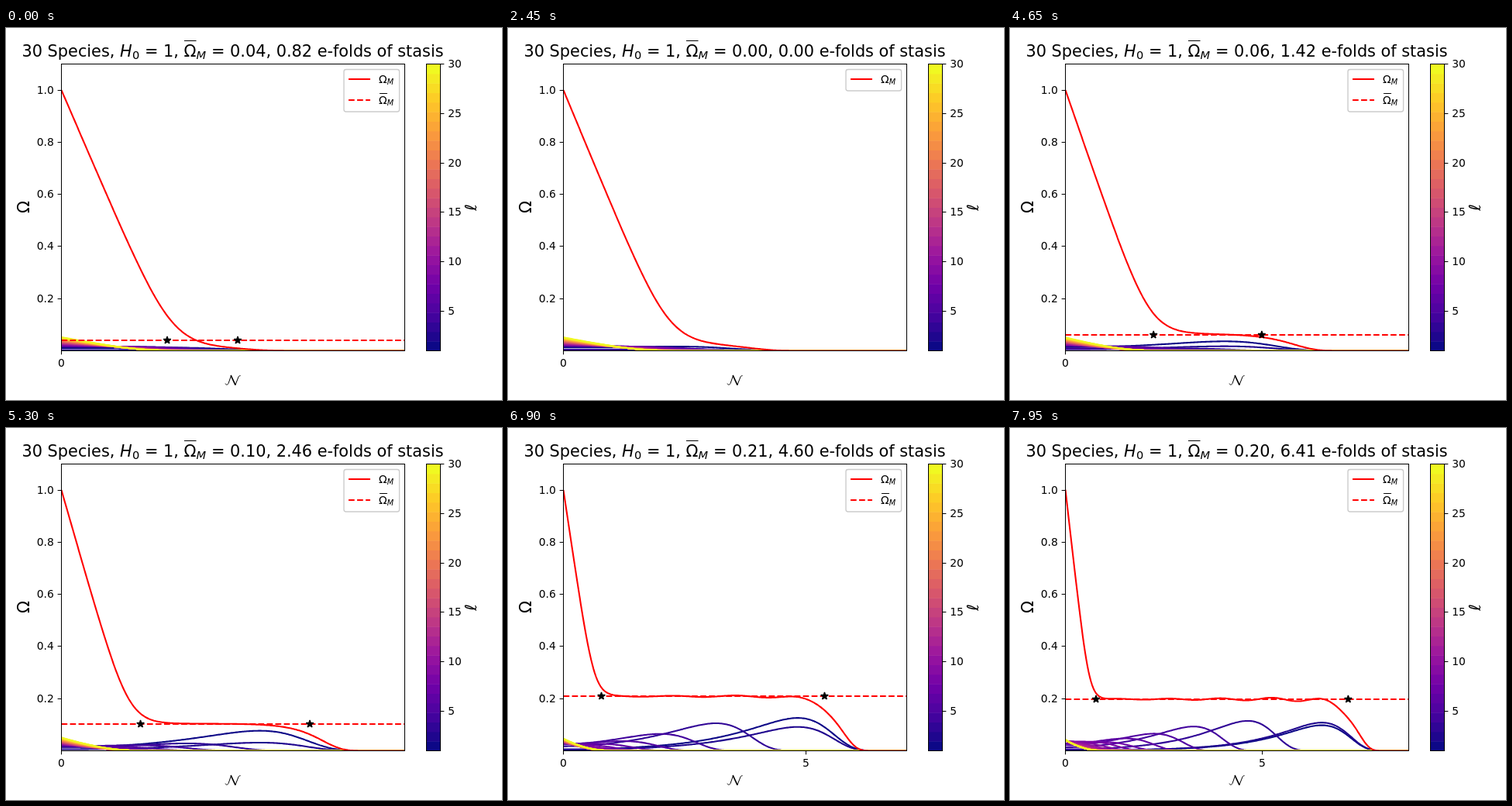
An HTML page for the animation above (8000 ms loop, 640 by 480 pixels).

```html
<!DOCTYPE html>
<html lang="en">
<head>
<meta charset="utf-8">
<title>Stasis</title>
<style>
  html, body { margin: 0; width: 100%; height: 100%; overflow: hidden; background: #fff; }
  svg { display: block; width: 640px; height: 480px; font-family: "DejaVu Sans", sans-serif; }
  text { white-space: pre; }
  .it { font-style: oblique; }
  .ax { fill: none; stroke: #000; stroke-width: 1; }
  .ln { fill: none; stroke-width: 2.08; stroke-linejoin: round; }
  .red { stroke: #f00; }
  .dash { stroke-dasharray: 7.71 3.33; }
</style>
</head>
<body>
<svg id="fig" viewBox="0 0 640 480" xmlns="http://www.w3.org/2000/svg"></svg>
<script>
const LOOP = 8000, STEP = 50, SPECIES = 30;
const X0 = 71.5, X1 = 514.5, Y0 = 416.5, Y1 = 46.5, WIDTH = X1 - X0;
const UNIT = (Y0 - Y1) / 1.1;
const BAR_OFF = 1200, BAR_ON = 4600;

// span: e-folds shown; from, folds: stasis; bar: dashed level
// fall: first slope; flat: plateau; peak: last maximum
// ratio: spacing of log decay rates; base: least starting share
const KEYS = [
  { t: 0,    span: 3.992, from: 1.23,  folds: .82,  bar: .04,   fall: .766, flat: .015, peak: 1.23, ratio: .88, base: .012 },
  { t: 3800, span: 4.15,  from: 1.16,  folds: .5,   bar: .033,  fall: .79,  flat: .035, peak: 1.41, ratio: .86, base: .014 },
  { t: 5300, span: 4.988, from: 1.149, folds: 2.46, bar: .104,  fall: .92,  flat: .104, peak: 2.88, ratio: .65, base: .015 },
  { t: 6250, span: 6.284, from: .851,  folds: 3.56, bar: .202,  fall: 1.1,  flat: .2,   peak: 3.98, ratio: .65, base: .02 },
  { t: 6900, span: 7.077, from: .783,  folds: 4.6,  bar: .211,  fall: 1.25, flat: .209, peak: 4.83, ratio: .68, base: .024 },
  { t: 7950, span: 8.727, from: .778,  folds: 6.41, bar: .197,  fall: 1.33, flat: .198, peak: 6.52, ratio: .73, base: .036 }
];

// Monotone cubic through the points
function pchip(xs, ys) {
  const n = xs.length - 1, d = [], m = [];
  for (let i = 0; i < n; i++) d[i] = (ys[i + 1] - ys[i]) / (xs[i + 1] - xs[i]);
  m[0] = d[0];
  m[n] = d[n - 1];
  for (let i = 1; i < n; i++) m[i] = d[i - 1] * d[i] > 0 ? 2 * d[i - 1] * d[i] / (d[i - 1] + d[i]) : 0;
  return x => {
    if (x >= xs[n]) return ys[n];
    let i = 0;
    while (x > xs[i + 1]) i++;
    const h = xs[i + 1] - xs[i], u = (x - xs[i]) / h, v = 1 - u;
    return ys[i] * v * v * (1 + 2 * u) + ys[i + 1] * u * u * (3 - 2 * u)
      + h * u * v * (m[i] * v - m[i + 1] * u);
  };
}

const tracks = Object.keys(KEYS[0]).slice(1)
  .map(name => [name, pchip(KEYS.map(k => k.t), KEYS.map(k => k[name]))]);
const stateAt = t => Object.fromEntries(tracks.map(([name, f]) => [name, f(t)]));

// Total matter share: soft-cornered fall, rippled plateau, double-exponential end
function matter(s) {
  const soft = .14, ripple = Math.max(0, .012 * (s.span - 5));
  return n => {
    const fall = soft * Math.log1p(Math.exp((1 - s.flat - s.fall * n) / soft));
    const end = Math.exp(-Math.exp((n - s.peak - .92) / .28));
    const wave = 1 + ripple * Math.exp((n - s.peak) / 3) * Math.cos(2 * Math.PI * (n - s.peak) / 1.3);
    return fall + s.flat * end * wave;
  };
}

const PTS = 296, DX = WIDTH / PTS;

// ln H' = m/2 - 2 and ln W' = 1 - m - rate/H for every species
function solve(s) {
  const total = matter(s), dn = s.span / PTS;
  const m = Array.from({ length: PTS + 1 }, (_, i) => total(i * dn));
  const hub = [1], grow = [0], age = [0];
  for (let i = 1; i <= PTS; i++) {
    const mid = (m[i] + m[i - 1]) / 2;
    hub[i] = hub[i - 1] * Math.exp((mid / 2 - 2) * dn);
    grow[i] = grow[i - 1] + (1 - mid) * dn;
    age[i] = age[i - 1] + dn * (1 / hub[i] + 1 / hub[i - 1]) / 2;
  }
  const turn = i => hub[i] * (1 - m[i]);
  const slow = Math.log(turn(Math.round(s.peak / dn))), fast = Math.log(1.65 * s.fall);
  const share = .29 + .063 * (s.span - 5), top = .057 - .4 * s.base;
  const list = [];
  let last = 0;
  for (let l = 1; l <= SPECIES; l++) {
    const rate = Math.exp(fast - (fast - slow) * s.ratio ** Math.max(0, l - 2));
    let first = s.base + (top - s.base) * (l - 1) / (SPECIES - 1);
    let p = PTS;
    while (p > 0 && turn(p) < rate) p--;
    if (p > 0) {
      // A peak fills what the slower species leave of the plateau
      const rest = Math.max(1e-4, s.flat - list.reduce((sum, f) => sum + f(p), 0));
      const height = l < 3 ? 1.04 * s.flat * (l === 1 ? 1 - share : share)
        : Math.tanh(.75 * Math.max(.1, (last - p) * dn)) * rest;
      first = Math.min(first, height * Math.exp(rate * age[p] - grow[p]));
      last = p;
    }
    list.push(i => first * Math.exp(grow[i] - rate * age[i]));
  }
  return { m, list };
}

const PLASMA = ['0d0887', '46039f', '7201a8', '9c179e', 'bd3786', 'd8576b', 'ed7953', 'fb9f3a', 'fdca26', 'f0f921']
  .map(h => [0, 2, 4].map(i => parseInt(h.slice(i, i + 2), 16)));
function plasma(u) {
  const p = u * (PLASMA.length - 1), i = Math.min(Math.floor(p), PLASMA.length - 2);
  return `rgb(${PLASMA[i].map((c, j) => Math.round(c + (PLASMA[i + 1][j] - c) * (p - i)))})`;
}
const tint = l => plasma((l - 1) / (SPECIES - 1));
const yOf = v => Y0 - v * UNIT;
const snap = y => Math.floor(y) + .5;

// Markup helpers
const txt = (x, y, size, s, extra = '') => `<text x="${x}" y="${y}" font-size="${size}" ${extra}>${s}</text>`;
const path = (d, cls, extra = '') => `<path d="${d}" class="${cls}" ${extra}/>`;
const IT = 'class="it"';
const omegaM = (x, y, size) => txt(x, y, size, 'Ω') + txt(x + size * .768, y + size * .16, size * .7, 'M', IT);
const TICK = 13.89, BIG = 20.83;

function star() {
  let d = '';
  for (let i = 0; i < 10; i++) {
    const r = i % 2 ? 1.91 : 5, a = i * Math.PI / 5;
    d += (i ? 'L' : 'M') + (r * Math.sin(a)).toFixed(2) + ' ' + (-r * Math.cos(a)).toFixed(2);
  }
  return `<path class="star" d="${d}Z" stroke="#000" stroke-width="1.39" stroke-linejoin="bevel"/>`;
}

function build() {
  let s = '<rect width="640" height="480" fill="#fff"/>';
  s += `<clipPath id="box"><rect x="${X0}" y="${Y1}" width="${WIDTH}" height="${Y0 - Y1}"/></clipPath><g clip-path="url(#box)">`;
  for (let l = 1; l <= SPECIES; l++) s += path('', 'ln sp', `stroke="${tint(l)}"`);
  s += path('', 'ln red', 'id="total"') + `<g class="stasis">${path('', 'ln red dash', 'id="level"')}${star()}${star()}</g></g>`;

  // Axes
  s += `<rect class="ax" x="${X0}" y="${Y1}" width="${WIDTH}" height="${Y0 - Y1}"/>`;
  for (let i = 1; i <= 5; i++) {
    const y = snap(yOf(i / 5));
    s += path(`M${X0} ${y}h-4.86`, 'ax') + txt(61.8, y + 4.5, TICK, (i / 5).toFixed(1), 'text-anchor="end"');
  }
  const xTick = n => path('M0 416.5v4.86', 'ax') + txt(0, 437, TICK, n, 'text-anchor="middle"');
  s += `<g transform="translate(${X0} 0)">${xTick(0)}</g><g id="five">${xTick(5)}</g>`;
  s += txt(0, 0, BIG, 'Ω', 'text-anchor="middle" transform="translate(29.7 231) rotate(-90)"');
  s += txt(0, 0, BIG, 'ℓ', 'text-anchor="middle" transform="translate(607.3 231.5) rotate(-90)"');
  s += '<g fill="none" stroke="#000" stroke-linecap="round" transform="translate(292.5 454.5) scale(.9) translate(-293 -454.5)">'
    + '<path stroke-width="1.1" d="M282.6 459.6c.8 2 3.2 1.8 4.3-.6l4-11.4M297 461l4-10.5c.7-1.8 1.6-2.8 2.8-2.5"/>'
    + '<path stroke-width="1.8" d="M290.6 448l6 12.8"/></g>';

  // Colour bar
  const cell = (Y0 - Y1) / SPECIES;
  for (let l = 1; l <= SPECIES; l++)
    s += `<rect x="542.5" y="${Y0 - l * cell}" width="18" height="${cell + (l > 1 ? .5 : 0)}" fill="${tint(l)}"/>`;
  s += `<rect class="ax" x="542.5" y="${Y1}" width="18" height="${Y0 - Y1}"/>`;
  for (let l = 5; l <= SPECIES; l += 5) {
    const y = snap(Y0 - (l - 1) / (SPECIES - 1) * (Y0 - Y1));
    s += path(`M560.5 ${y}h4.86`, 'ax') + txt(570.2, y + 4.5, TICK, l);
  }

  // Legend
  s += '<rect id="legend" x="436" y="53.5" width="71.6" rx="2.8" fill="#fff" fill-opacity=".8" stroke="#ccc" stroke-width="1.39"/>';
  s += path('M442 66h28', 'ln red') + omegaM(481, 71, TICK);
  s += `<g class="stasis">${path('M442 93h28', 'ln red dash')}${omegaM(481, 98, TICK)}${path('M482 84.5h10', 'ax')}</g>`;

  // Title
  s += txt(20.5, 37, BIG, '30 Species,') + txt(147, 37, BIG, 'H', IT) + txt(163, 40.3, 14.58, '0');
  s += txt(179, 37, BIG, '= 1,') + omegaM(229.5, 37, BIG) + path('M230 16.5h15.5', 'ax');
  return s + txt(265, 37, BIG, '', 'id="tail"');
}

const fig = document.getElementById('fig');
fig.innerHTML = build();
const get = id => document.getElementById(id);
const all = q => [...fig.querySelectorAll(q)];
const total = get('total'), level = get('level'), five = get('five'), legend = get('legend'), tail = get('tail');
const lines = all('.sp'), stars = all('.star'), stasis = all('.stasis');

const grid = Array.from({ length: PTS + 1 }, (_, i) => X0 + i * DX);
const trace = f => 'M' + grid.map((x, i) => x.toFixed(1) + ' ' + yOf(f(i)).toFixed(2)).join('L');

function draw(t) {
  const s = stateAt(t), { m, list } = solve(s);
  const xOf = n => X0 + n / s.span * WIDTH;
  lines.forEach((line, k) => line.setAttribute('d', trace(list[k])));
  total.setAttribute('d', trace(i => m[i]));

  const on = t < BAR_OFF || t >= BAR_ON, y = Math.round(yOf(s.bar));
  stasis.forEach(g => g.setAttribute('visibility', on ? 'visible' : 'hidden'));
  legend.setAttribute('height', on ? 54.5 : 27.5);
  level.setAttribute('d', `M${X0} ${y}H${X1}`);
  stars.forEach((g, i) => g.setAttribute('transform', `translate(${xOf(s.from + i * s.folds)} ${y})`));
  const shown = v => (on ? v : 0).toFixed(2);
  tail.textContent = `= ${shown(s.bar)}, ${shown(s.folds)} e-folds of stasis`;
  five.setAttribute('visibility', s.span >= 5 ? 'visible' : 'hidden');
  five.setAttribute('transform', `translate(${snap(xOf(5))} 0)`);
}

const start = performance.now();
let last = -1;
function tick() {
  const t = Math.floor((performance.now() - start) % LOOP / STEP) * STEP;
  if (t !== last) draw(last = t);
  requestAnimationFrame(tick);
}
tick();
</script>
</body>
</html>
```
